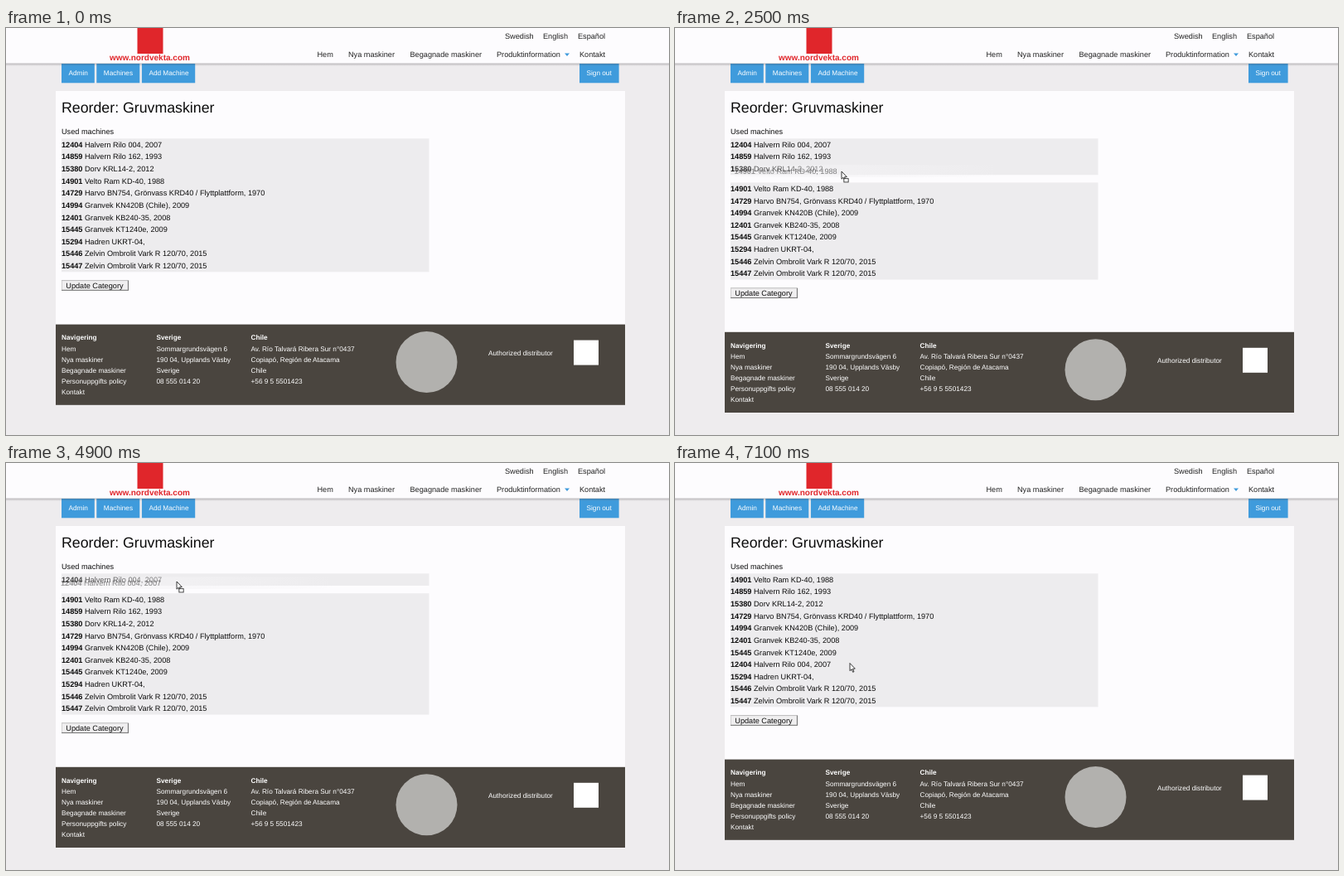
Animation, 800 px wide and 491 px high, one loop 7.2 s. Source, as an HTML page with a canvas:

```html
<!DOCTYPE html>
<html lang="sv">
<head>
<meta charset="utf-8">
<title>Reorder: Gruvmaskiner</title>
<style>
html, body { margin: 0; width: 100%; height: 100%; overflow: hidden; background: #eeecee; }
canvas { display: block; width: 800px; height: 491px; }
</style>
</head>
<body>
<canvas id="stage" width="800" height="491"></canvas>
<script>
const ctx = document.getElementById('stage').getContext('2d');
ctx.textRendering = 'geometricPrecision';

const LOOP = 7200, STEP = 100;
const ROW = 14.63, LIST_TOP = 133.4, GAP = 9.2;
const BODY = 9.16, SMALL = 8.24;
const BLUE = '#3f9bdc', INK = '#0c0c0c', PANEL = '#fdfcfe', GREY = '#edecee', RED = '#e0262b';

const machines = [
  ['12404', 'Halvern Rilo 004, 2007'],
  ['14859', 'Halvern Rilo 162, 1993'],
  ['15380', 'Dorv KRL14-2, 2012'],
  ['14901', 'Velto Ram KD-40, 1988'],
  ['14729', 'Harvo BN754, Grönvass KRD40 / Flyttplattform, 1970'],
  ['14994', 'Granvek KN420B (Chile), 2009'],
  ['12401', 'Granvek KB240-35, 2008'],
  ['15445', 'Granvek KT1240e, 2009'],
  ['15294', 'Hadren UKRT-04,'],
  ['15446', 'Zelvin Ombrolit Vark R 120/70, 2015'],
  ['15447', 'Zelvin Ombrolit Vark R 120/70, 2015']
];

const footer = [
  [67, ['Navigering', 'Hem', 'Nya maskiner', 'Begagnade maskiner', 'Personuppgifts policy', 'Kontakt']],
  [181.5, ['Sverige', 'Sommargrundsvägen 6', '190 04, Upplands Väsby', 'Sverige', '08 555 014 20']],
  [295.5, ['Chile', 'Av. Río Talvará Ribera Sur n°0437', 'Copiapó, Región de Atacama', 'Chile', '+56 9 5 5501423']]
];

// Each drag: picked row, target row, grab point, and its phases in ms.
const drags = [
  { from: 3, to: 1, grabX: 196.5, grabY: 185, start: 2000, gapAt: 2100, drop: 3700 },
  { from: 0, to: 7, grabX: 207, grabY: 139, start: 4900, gapAt: 4900, drop: 6500 }
];

// Pointer path: time, x, y.
const path = [
  [300, 800, 330], [900, 640, 270], [1600, 197, 185], [1900, 197, 185], [2000, 197, 181],
  [2500, 201, 173], [3400, 204, 143], [3800, 205, 142], [4700, 206.5, 138.5],
  [4900, 206, 143], [5700, 205.5, 222], [6200, 209, 247.5], [6500, 210, 248], [7100, 211, 241.5]
];
const holds = [1900, 3500, 3900, 4800, 6200, 6800];

function rect(x, y, w, h, color) {
  ctx.fillStyle = color;
  ctx.fillRect(x, y, w, h);
}

function text(str, x, y, size = BODY, color = INK, weight = 'normal') {
  ctx.font = `${weight} ${size}px "Liberation Sans", Arial, sans-serif`;
  ctx.fillStyle = color;
  ctx.fillText(str, x, y);
}

function polygon(points, fill, stroke) {
  ctx.beginPath();
  points.forEach(([x, y]) => ctx.lineTo(x, y));
  ctx.closePath();
  ctx.fillStyle = fill;
  ctx.fill();
  if (stroke) {
    ctx.strokeStyle = stroke;
    ctx.lineWidth = 0.9;
    ctx.stroke();
  }
}

function pointerAt(t) {
  const i = path.findIndex(p => p[0] >= t);
  if (t < path[0][0] || i < 0) return null;
  if (i === 0) return { x: path[0][1], y: path[0][2] };
  const [t0, x0, y0] = path[i - 1], [t1, x1, y1] = path[i];
  const k = (t - t0) / (t1 - t0);
  return { x: x0 + (x1 - x0) * k, y: y0 + (y1 - y0) * k };
}

function orderAt(t) {
  const rows = machines.slice();
  for (const d of drags) {
    if (t >= d.drop) rows.splice(d.to, 0, rows.splice(d.from, 1)[0]);
  }
  return rows;
}

function drawHeader() {
  rect(0, 0, 800, 43, PANEL);

  rect(158.5, 0, 31, 31, RED);
  text('www.nordvekta.com', 125, 39, 10, RED, 'bold');

  [['Swedish', 602], ['English', 648], ['Español', 690]].forEach(([s, x]) => text(s, x, 12.9, BODY, '#222'));
  [['Hem', 375.5], ['Nya maskiner', 413], ['Begagnade maskiner', 487.5], ['Produktinformation', 592], ['Kontakt', 692]]
    .forEach(([s, x]) => text(s, x, 34.8, BODY, '#222'));
  polygon([[674, 30.5], [680, 30.5], [677, 34]], BLUE);

  [['Admin', 67, 39.8], ['Machines', 109.3, 52], ['Add Machine', 163.9, 64.3], ['Sign out', 692, 47.6]]
    .forEach(([s, x, w]) => {
      rect(x, 43, w, 23.3, BLUE);
      text(s, x + 8.5, 57.3, SMALL, '#fff');
    });

  // The header casts its shadow over the tabs as well.
  const shadow = ctx.createLinearGradient(0, 42.5, 0, 46);
  shadow.addColorStop(0, 'rgba(70,65,70,0.32)');
  shadow.addColorStop(1, 'rgba(70,65,70,0)');
  rect(0, 42.5, 800, 3.5, shadow);
}

function drawRow([id, name], x, y, color) {
  text(id, x, y, BODY, color, 'bold');
  text(name, x + 28, y, BODY, color);
}

function drawList(rows, gap) {
  rows.forEach((row, i) => {
    const y = LIST_TOP + i * ROW + (gap !== null && i >= gap ? GAP : 0);
    drawRow(row, 67, y + 10.4, INK);
  });
}

function drawListBack(gap) {
  const height = ROW * machines.length;
  const split = gap === null ? height : gap * ROW;
  rect(67, LIST_TOP, 443.5, split, GREY);
  if (gap !== null) rect(67, LIST_TOP + split + GAP, 443.5, height - split, GREY);
}

function drawButton(y) {
  rect(67, y, 81, 12.5, '#777');
  rect(67, y, 80, 11.5, '#d0d0d0');
  rect(68, y + 0.8, 78.6, 10.2, '#f0eff0');
  text('Update Category', 72.3, y + 9.2);
}

function drawFooter(y) {
  rect(60, y, 687, 97.2, '#4a453f');
  for (const [x, lines] of footer) {
    lines.forEach((s, i) => text(s, x, y + 18.8 + i * 13.15, SMALL, '#fff', i ? 'normal' : 'bold'));
  }
  ctx.beginPath();
  ctx.arc(507.5, y + 45.5, 37, 0, Math.PI * 2);
  ctx.fillStyle = '#b2b1ae';
  ctx.fill();
  text('Authorized distributor', 582, y + 36.9, SMALL, '#fff');
  rect(685, y + 19, 30, 30, '#fff');
}

// Translucent copy of the dragged row, fading away from the pointer.
function drawGhost(row, drag, p) {
  const fade = (rgb, near, far) => {
    const g = ctx.createRadialGradient(p.x, p.y, 0, p.x, p.y, 190);
    g.addColorStop(0, `rgba(${rgb},${near})`);
    g.addColorStop(0.75, `rgba(${rgb},${far})`);
    g.addColorStop(1, `rgba(${rgb},0)`);
    return g;
  };
  const x = 67 + p.x - drag.grabX;
  const y = LIST_TOP + drag.from * ROW + p.y - drag.grabY;
  rect(x, y, 443.5, ROW, fade('244,243,245', 0.6, 0.2));
  drawRow(row, x, y + 10.4, fade('0,0,0', 0.5, 0.34));
}

function drawPointer({ x, y }, dragging) {
  const arrow = [[0, 0], [0, 9.2], [2.1, 7.3], [3.6, 10.8], [5, 10.2], [3.5, 6.8], [6.3, 6.6]];
  polygon(arrow.map(([dx, dy]) => [x + dx, y + dy]), '#fff', '#222');
  if (!dragging) return;
  rect(x + 2.4, y + 8.2, 6.2, 5.2, '#333');
  rect(x + 3.3, y + 9.1, 4.4, 3.4, '#fff');
}

function draw(time) {
  let t = Math.floor(time % LOOP / STEP) * STEP;
  if (holds.includes(t)) t -= STEP;

  const pointer = pointerAt(t);
  const drag = drags.find(d => t >= d.start && t < d.drop);
  const lifted = drag && t >= drag.gapAt;
  const gap = lifted ? Math.round((pointer.y - LIST_TOP) / ROW) : null;
  const shift = lifted ? GAP : 0;
  const rows = orderAt(t);

  rect(0, 0, 800, 491, '#eeecee');
  drawHeader();
  rect(60, 76, 687, 282 + shift, PANEL);
  text('Reorder: Gruvmaskiner', 67, 101.7, 17.75);
  text('Used machines', 67, 128.3);
  drawListBack(gap);
  drawList(rows, gap);
  drawButton(304.4 + shift);
  drawFooter(357.6 + shift);
  if (lifted) drawGhost(rows[drag.from], drag, pointer);
  if (pointer) drawPointer(pointer, Boolean(drag));
}

const begin = performance.now();
function tick() {
  draw(performance.now() - begin);
  requestAnimationFrame(tick);
}
tick();
</script>
</body>
</html>
```
